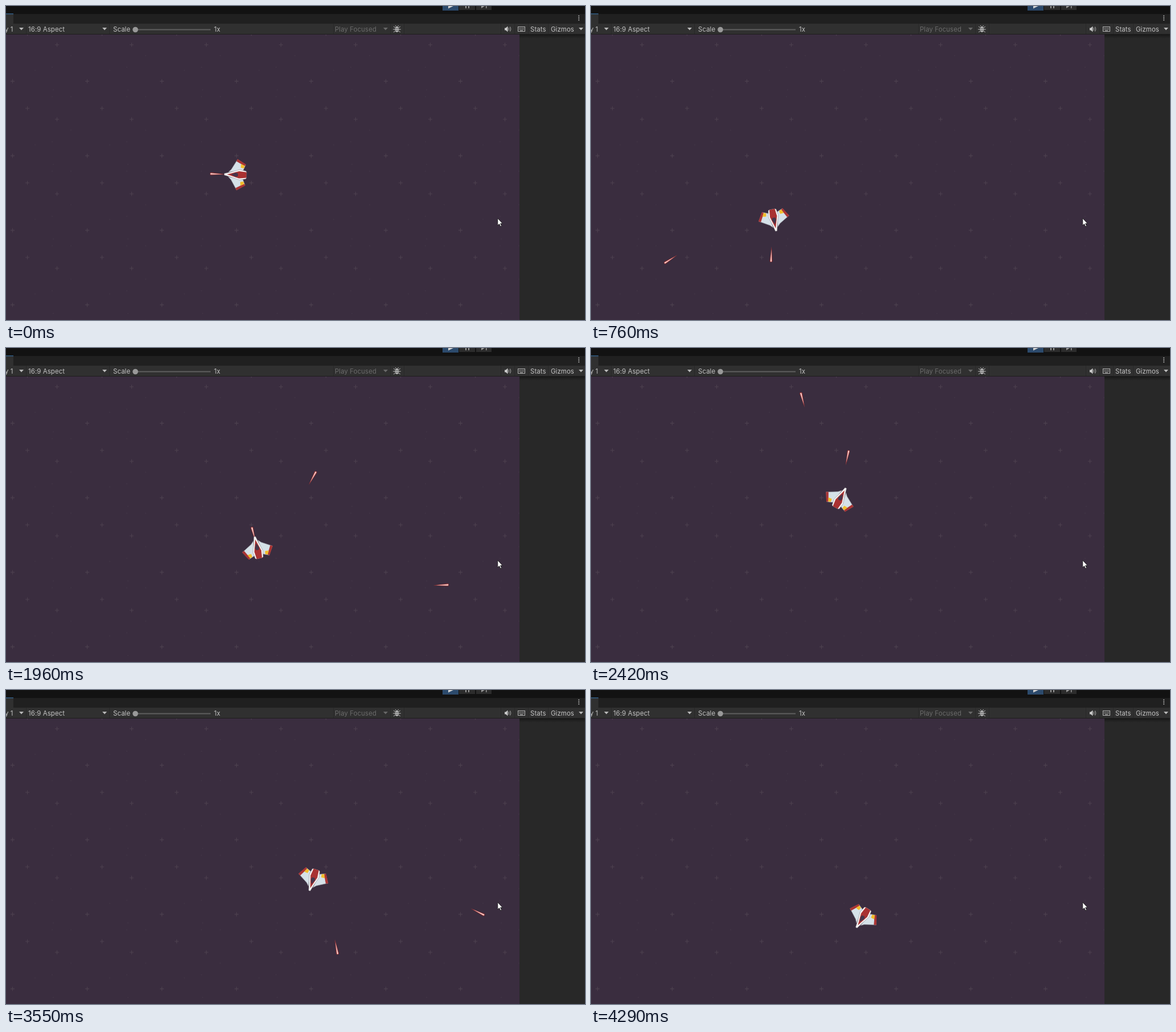
Recreate the animation shown at these times as an HTML page. Size 1016 by 551 pixels, loop 4.35 s.

```html
<!DOCTYPE html>
<html lang="en">
<head>
<meta charset="utf-8">
<title>Game view</title>
<style>
html, body { margin: 0; width: 100%; height: 100%; overflow: hidden; background: #282828; }
svg { display: block; width: 1016px; height: 551px; }
text { font: 11.4px Inter, Roboto, sans-serif; fill: #c4c4c4; letter-spacing: .1px; }
</style>
</head>
<body>
<svg viewBox="0 0 1016 551">
  <defs>
    <pattern id="stars" width="131" height="130.8" x="0" y="50" patternUnits="userSpaceOnUse">
      <path d="M86 18h7M89.500 14.500v7M8 82h7M11.500 78.500v7M34 129.500h7M37.500 126v4.800M37.500 0v2.200"
        stroke="#4d414f" fill="none"/>
      <path d="M113 37h2M80 57.500h2M50 63h2M82 97h2M80 109h2M113 109h2" stroke="#443748"/>
    </pattern>
    <linearGradient id="shade" x2="0" y2="1">
      <stop stop-color="#191919"/><stop offset="1" stop-color="#282828"/>
    </linearGradient>
    <clipPath id="view"><rect y="50" width="901" height="501"/></clipPath>
    <g id="bolt">
      <path d="M-27 0L-2-2.200L0-1.500V1.500L-2 2.200Z" fill="#b13a38"/>
      <path d="M-22 0L-2-1H-.8V1H-2Z" fill="#f4dfdc"/>
    </g>
    <g id="wing">
      <path d="M13 4L8 9L-2.500 27L-17 18L-13 8Z" fill="#d5e1e8" stroke="#8d8a95" stroke-width=".6"/>
      <path d="M-2.500 27.500L-17.500 18.500L-15.500 15.500L-.5 23.500Z" fill="#a93434"/>
      <path d="M-8.500 12.500L-14 11.500L-15.500 16L-9 19Z" fill="#f2bd2b"/>
    </g>
  </defs>

  <rect width="1016" height="14" fill="#121212"/>
  <rect y="14" width="1016" height="17" fill="#202020"/>
  <rect y="31" width="1016" height="19" fill="#303030"/>
  <rect y="14" width="13" height="17" fill="#303030"/>
  <rect y="13" width="13" height="1.500" fill="#315c85"/>
  <rect x="766" width="28" height="8" fill="#2c4a6c"/>
  <path d="M795 0h28v7h-28zM825 0h27v7h-27z" fill="#2c2c2c"/>
  <path d="M776 0h9l-9 4.500z" fill="#d0d0d0"/>
  <path d="M806 0h2v4h-2zM811 0h2v4h-2zM834 0h6l-6 4zM842 0h1.500v4h-1.500z" fill="#949494"/>
  <path d="M1004.200 16.500h2v2h-2zM1004.200 20h2v2h-2zM1004.200 23.500h2v2h-2z" fill="#a4a4a4"/>
  <path d="M35.500 31v18M181.500 31v18M574.500 31v18M674.500 31v18M698.500 31v18M868.500 31v18M892.500 31v18M916.500 31v18M951.500 31v18"
    stroke="#282828"/>
  <path d="M23 38h8l-4 4.500zM169 38h8l-4 4.500zM1005 38h8l-4 4.500z" fill="#b8b8b8"/>
  <path d="M662 38h8l-4 4.500z" fill="#686868"/>
  <text x="-2" y="45">y 1</text>
  <text x="39" y="45">16:9 Aspect</text>
  <text x="188" y="45">Scale</text>
  <text x="365" y="45">1x</text>
  <text x="577" y="45" style="fill:#6b6b6b">Play Focused</text>
  <text x="920" y="45">Stats</text>
  <text x="956" y="45">Gizmos</text>
  <path d="M228 41.500h131" stroke="#5e5e5e" stroke-width="2"/>
  <circle cx="227" cy="41.500" r="4.800" fill="#999"/>
  <g stroke="#b4b4b4" fill="none">
    <path d="M680 36l3 2M679 41h4M680 46l3-2M692 36l-3 2M693 41h-4M692 46l-3-2M683 34l2 2M689 34l-2 2"/>
    <ellipse cx="686" cy="41" rx="3.500" ry="5" fill="#b4b4b4" stroke="none"/>
    <path d="M683 39.500h6M683 42.500h6" stroke="#404040" stroke-width=".7"/>
    <path d="M875 38.500h2l3.500-3v10l-3.500-3h-2z" fill="#c8c8c8" stroke="none"/>
    <path d="M882 38q1.500 2.500 0 5M884.500 36.500q2.500 4 0 8"/>
    <rect x="898.500" y="36.500" width="12" height="8"/>
    <path d="M900 39h9.500M900 41h9.500" stroke-dasharray="1.500 1"/><path d="M902 43h5"/>
  </g>

  <rect y="49" width="1016" height="1" fill="#1d1d1d"/>
  <rect x="901" y="50" width="115" height="501" fill="#282828"/>
  <rect x="901" y="50" width="115" height="7" fill="url(#shade)"/>
  <g clip-path="url(#view)">
    <rect y="50" width="901" height="501" fill="#3a2d3f"/>
    <rect y="50" width="901" height="501" fill="url(#stars)"/>
    <g id="bolts"></g>
    <g id="ship">
      <use href="#wing"/><use href="#wing" transform="scale(1 -1)"/>
      <path d="M20-1.500L8-4.500L-7-9L-18-7L-19-5V5L-18 7L-7 9L8 4.500L20 1.500Z" fill="#f5f4f3" stroke="#77717b" stroke-width=".4"/>
      <path d="M15 0L-6-6.200L-19-4.800V4.800L-6 6.200Z" fill="#a93232"/>
      <path d="M8 0L0-3.800L-4-2.500V2.500L0 3.800Z" fill="#47354a"/>
    </g>
  </g>
  <path d="M862.800 372.500v12.500l2.800-2.500l2 4.500l2-.9l-2-4.300h3.700z" fill="#fff" stroke="#111" stroke-width=".8"/>
</svg>
<script>
const LOOP = 4350, STEPS = 65;   // the picture advances in held steps
const PERIOD = 4.886;            // steps between shots
const SPEED = 34.9, MUZZLE = 45; // bolt px per step, tip distance when fired

// Ship pose [x, y, degrees] at each shot; the last two are silent
const poses = [
  [403, 296, 182], [346, 312, 147.3], [319, 361.5, 92], [346, 414, 41],
  [402, 428, -1.9], [446, 396, -61.3], [440, 347, -105], [430, 285, -78],
  [462, 234, -33.5], [518, 233.5, 26.7], [546, 278, 79], [535, 342, 113],
  [497, 386, 140], [477, 399.5, 122]];
const shots = poses.slice(0, -2);

const pose = i => poses[Math.max(0, Math.min(poses.length - 1, i))];

// Catmull-Rom position, steady turning
function shipAt(step) {
  const i = Math.floor(step / PERIOD), u = step / PERIOD - i, v = 1 - u;
  const [p, a, b, q] = [-1, 0, 1, 2].map(k => pose(i + k));
  const curve = k => a[k] * v * v * (1 + 2 * u) + b[k] * u * u * (3 - 2 * u)
    + u * v * ((b[k] - p[k]) * v - (q[k] - a[k]) * u) / 2;
  return [curve(0), curve(1), a[2] + (b[2] - a[2]) * u];
}

function boltAt([x, y, deg], age) {
  const far = MUZZLE + SPEED * age, rad = deg * Math.PI / 180;
  return [x + far * Math.cos(rad), y + far * Math.sin(rad), deg];
}

function place(el, [x, y, deg]) {
  el.setAttribute("transform", `translate(${x.toFixed(2)} ${y.toFixed(2)}) rotate(${deg.toFixed(2)})`);
}

const ship = document.getElementById("ship");
const bolts = shots.map(() => {
  const el = document.createElementNS(ship.namespaceURI, "use");
  el.setAttribute("href", "#bolt");
  return document.getElementById("bolts").appendChild(el);
});

function draw(ms) {
  const step = Math.floor(ms % LOOP / LOOP * STEPS);
  place(ship, shipAt(step));
  bolts.forEach((el, i) => {
    const age = step - i * PERIOD;
    el.style.display = age < -0.5 ? "none" : "";
    place(el, boltAt(shots[i], age));
  });
}

const start = performance.now();
function tick() {
  draw(performance.now() - start);
  requestAnimationFrame(tick);
}
tick();
</script>
</body>
</html>
```
